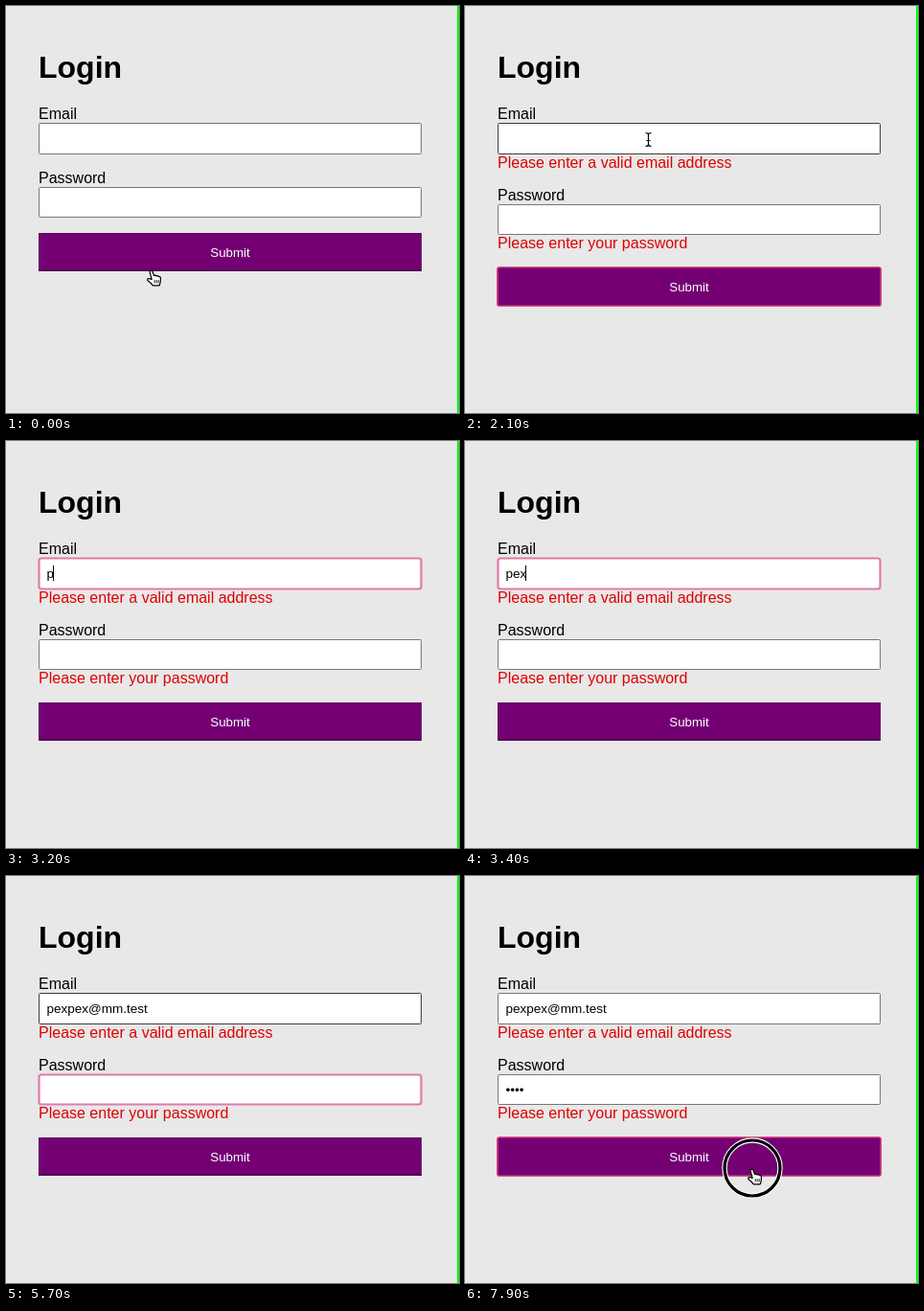
Animation of 473 by 425 pixels, one loop 8 s. Source, as an HTML page:

```html
<!DOCTYPE html>
<html lang="en">
<head>
<meta charset="utf-8">
<title>Login form</title>
<style>
  html, body { margin: 0; width: 100%; height: 100%; overflow: hidden; background: #e8e8e8; }
  svg { display: block; font: 16px "Liberation Sans", Arial, sans-serif; }
  .title { font-size: 32px; font-weight: bold; }
  .value { font-size: 13.5px; }
  .error { fill: #e00000; }
  .submit { font-size: 13.33px; fill: #fff; text-anchor: middle; }
  .option { font: 600 13px Inter, sans-serif; fill: #ececee; }
</style>
</head>
<body>
<svg id="stage" width="473" height="425" viewBox="0 0 473 425"></svg>
<script>
const stage = document.getElementById('stage');
const pen = document.createElement('canvas').getContext('2d');
pen.font = '13.5px "Liberation Sans", Arial, sans-serif';

const LOOP = 8000;
const EMAIL = 'pexpex@mm.test';
const EMAIL_KEYS = [3200, 3300, 3400, 3600, 3800, 4300, 4400, 4500, 4600, 4700, 4800, 4900, 5000, 5100];
const PASSWORD_KEYS = [5900, 6100, 6300, 6500];
const OPTIONS = ['plim@ort.test', 'tinpebblelunar@example.com', 'hazel.moth@example.org',
  'ruftopal@example.com', 'marlowquill@example.com', 'hum@ktv.test'];
// time, x, y
const MOUSE = [[1200, 164, 259], [2100, 191, 139], [6600, 191, 139],
  [7300, 299, 320], [7500, 300, 311], [7700, 300, 305]];

const CURSORS = {
  hand: `<path d="M-2 1.4Q-.7-.8 .8 1L2.6 5.6Q4 4.6 5 6Q6.4 5 7.4 6.6Q9.2 6 9.4 8.4Q9.8 12 8.2 15.8H1.4Q-1 12.6-4.2 10.4Q-4.8 8-1.8 8.8L.2 9.6Z"
      fill="#fff" stroke="#000" stroke-width="1.2" stroke-linejoin="round"/>
    <path d="M3.2 10.2v3.2M5.2 10.2v3.2M7.2 10.2v3.2" stroke="#000" stroke-width=".9"/>`,
  beam: ['#fff" stroke-width="2.6', '#000" stroke-width="1.2'].map(stroke =>
    `<path d="M-2.5-6.5Q.5-6.5 .5-4.5V5.5Q.5 7.5-2.5 7.5M3.5-6.5Q.5-6.5 .5-4.5M.5 5.5Q.5 7.5 3.5 7.5M-1.5 1.5H2.5"
      fill="none" stroke="${stroke}"/>`).join(''),
  arrow: '<path d="M0 0V14L3.3 11 5.6 16 7.8 15 5.6 10.2H10Z" fill="#000" stroke="#fff"/>'
};

const text = (x, y, str, cls = '') => `<text x="${x}" y="${y}" class="${cls}">${str}</text>`;
const within = (v, from, to) => v >= from && v < to;
const typed = (keys, t) => keys.filter(k => k <= t).length;

function mouseAt(t) {
  if (t < 500) return [152, 276];
  const next = MOUSE.findIndex(k => k[0] > t);
  if (next < 1) return MOUSE[next ? MOUSE.length - 1 : 0].slice(1);
  const [a, b] = [MOUSE[next - 1], MOUSE[next]];
  const p = (t - a[0]) / (b[0] - a[0]);
  return [a[1] + (b[1] - a[1]) * p, a[2] + (b[2] - a[2]) * p];
}

function field(y, h, value, focused, hover, caret) {
  const frame = focused
    ? `<rect x="34.5" y="${y + .5}" width="399" height="${h - 1}" rx="2.5" fill="#fff" stroke="#e07aab" stroke-width="2.2"/>`
    : `<rect x="34.5" y="${y + .5}" width="399" height="${h - 1}" rx="1" fill="#fff" stroke="${hover ? '#3c3c3c' : '#767676'}"/>`;
  const end = Math.round(42.5 + pen.measureText(value).width);
  return frame + text(42.5, y + 21, value, 'value') +
    (focused && caret ? `<path d="M${end - .5} ${y + 8}v16" stroke="#000"/>` : '');
}

function button(y, focused) {
  const edge = focused
    ? `<rect x="34" y="${y}" width="400" height="40" rx="2" fill="none" stroke="#c62a72" stroke-width="1.7"/>`
    : `<path d="M34.5 ${y + 40}V${y + .5}H433.5V${y + 40}" fill="none" stroke="#620062"/>
       <path d="M34 ${y + 39}h400" stroke="#520052" stroke-width="2"/>`;
  return `<rect x="34" y="${y}" width="400" height="40" fill="#740074"/>` + edge +
    text(234, y + 25, 'Submit', 'submit');
}

const dropdown = () =>
  `<rect x="33.5" y="156" width="401" height="234" rx="5" fill="#000" opacity=".18"/>
   <rect x="34" y="156" width="400" height="232" rx="4" fill="#232228"/>` +
  OPTIONS.map((o, i) => text(46, 187 + 36 * i, o, 'option')).join('');

const ring = (x, y) => `<g fill="none"><circle cx="${x}" cy="${y}" r="29" stroke="#fff" stroke-width="5.4"/>
  <circle cx="${x}" cy="${y}" r="29" stroke="#000" stroke-width="3.2"/></g>`;

function draw(t) {
  const errors = t >= 1200;
  const passY = errors ? 207 : 189, buttonY = errors ? 273 : 237;
  const focus = t < 1100 ? '' : t < 2800 ? 'button' : t < 5200 ? 'email' : t < 7900 ? 'password' : 'button';
  const caret = !within(t, 5700, 5900) && !within(t, 7000, 7500);
  const [mx, my] = mouseAt(t);
  const onEmail = within(my, 122, 155), onPass = within(my, passY, passY + 32);
  const onError = errors && (within(my, 157, 171) || within(my, 241, 256) && mx < 232);
  const cursor = within(my, buttonY, buttonY + 40) ? 'hand' : onEmail || onPass || onError ? 'beam' : 'arrow';

  let out = '<path d="M472 0V425" stroke="#00ff0c" stroke-width="2"/>' +
    text(34, 75, 'Login', 'title') +
    text(34, 118, 'Email') +
    field(122, 33, EMAIL.slice(0, typed(EMAIL_KEYS, t)), focus === 'email', onEmail, caret) +
    text(34, passY - 4, 'Password') +
    field(passY, 32, '•'.repeat(typed(PASSWORD_KEYS, t)), focus === 'password', onPass, caret) +
    button(buttonY, focus === 'button');
  if (errors) {
    out += text(34, 169, 'Please enter a valid email address', 'error') +
      text(34, 253, 'Please enter your password', 'error');
  }
  if (within(t, 2900, 3200)) out += dropdown();
  if (within(t, 1100, 1200) || t >= 7900) out += ring(mx, my);
  if (!within(t, 3200, 6700)) {
    const drop = cursor === 'hand' && t >= 900 ? 1 : 0;
    out += `<g transform="translate(${Math.round(mx)} ${Math.round(my) + drop})">${CURSORS[cursor]}</g>`;
  }
  stage.innerHTML = out;
}

const start = performance.now();
let shown = -1;
function tick() {
  const t = Math.floor((performance.now() - start) % LOOP / 100) * 100;
  if (t !== shown) draw(shown = t);
  requestAnimationFrame(tick);
}
tick();
</script>
</body>
</html>
```
